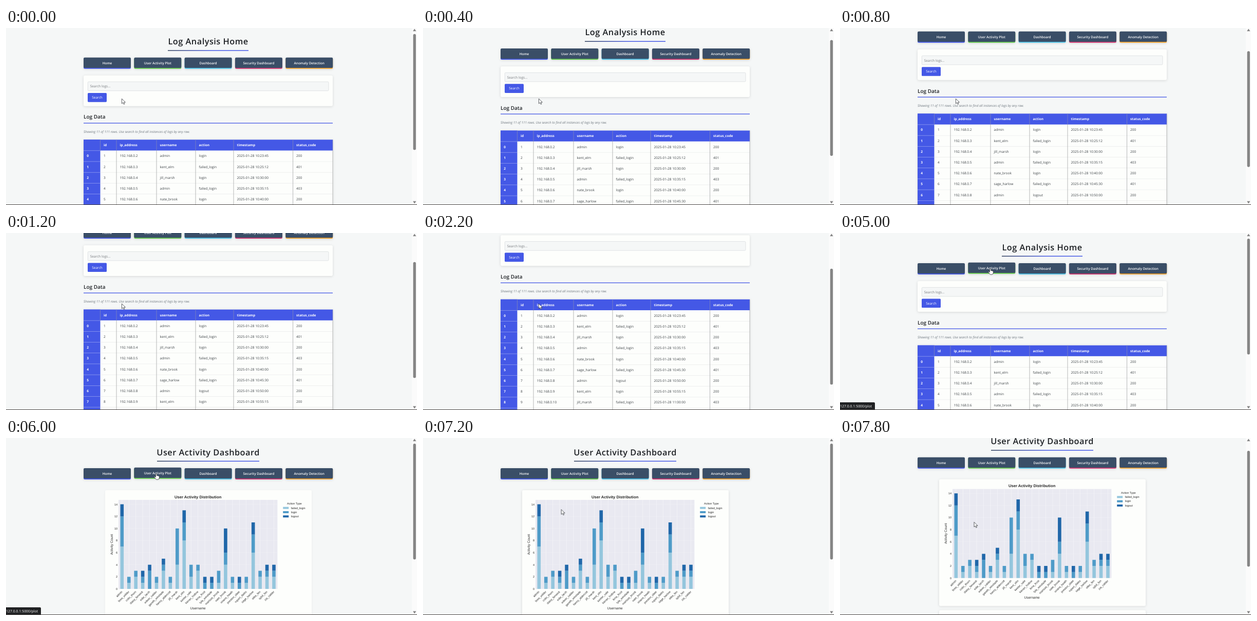
An HTML page that plays this animation: 800 by 346 pixels, repeating every 8000 ms.

```html
<!DOCTYPE html>
<html lang="en">
<head>
<meta charset="utf-8">
<title>Log Analysis</title>
<style>
  html, body { margin: 0; height: 100%; overflow: hidden; background: #f5f7f7; }
  svg { display: block; width: 100%; height: 100%; }
  text { font: 6.5px "Open Sans", "Noto Sans", sans-serif; fill: #3b4045; text-rendering: geometricPrecision; white-space: pre; }
  .title { font-size: 16.3px; font-weight: 600; letter-spacing: .5px; fill: #1d2024; }
  .heading { font-size: 10px; font-weight: 600; fill: #1d2024; }
  .bold { font-weight: 700; fill: #fff; }
  .nav { font-size: 6.45px; font-weight: 600; fill: #fff; }
  .light { fill: #fff; }
  .hint { fill: #75797d; }
  .note { font-size: 6.3px; font-style: italic; fill: #6c757d; }
  .status { font-size: 6.95px; fill: #fff; }
  .plot text { font: 5.5px "Liberation Sans", Arial, sans-serif; fill: #262626; }
  .plot .axis { font-size: 6.6px; }
  .plot .caption { font-size: 7.65px; font-weight: 700; }
  .mid { text-anchor: middle; }
  .end { text-anchor: end; }
  .shadow { filter: drop-shadow(0 1px 2.5px rgba(0, 0, 0, .13)); }
</style>
</head>
<body>
<svg id="stage" viewBox="0 0 800 346" xmlns="http://www.w3.org/2000/svg"></svg>
<script>
const BLUE = '#4458e6', PAPER = '#fdfefc', CENTER = 393.6;
const LOOP = 8000, STEP = 200, MAX_SCROLL = 146.5;

const rect = (x, y, w, h, fill, extra = '') =>
  `<rect x="${x}" y="${y}" width="${w}" height="${h}" fill="${fill}" ${extra}/>`;
const text = (s, x, y, cls = '', extra = '') =>
  `<text x="${x}" y="${y}" class="${cls}" ${extra}>${s}</text>`;
const group = (id, body, extra = '') => `<g id="${id}" ${extra}>${body}</g>`;

// Shared page header
const NAV = [
  ['Home', BLUE], ['User Activity Plot', '#62c84b'], ['Dashboard', '#4cc3e8'],
  ['Security Dashboard', '#d2336f'], ['Anomaly Detection', '#f2a32c'],
];

function pageTitle(label, x, w) {
  return text(label, CENTER, 33.6, 'title mid') + rect(x, 44.6, w, 1.5, 'url(#rule)');
}

function navButton([label, color], i) {
  const x = 151 + i * 98.3;
  const body = rect(x, 60, 92, 21, color, 'rx="2.5"') + rect(x, 59, 92, 20.3, '#3a4e67', 'rx="2.2"') +
    text(label, x + 46, 72.2, 'nav mid');
  return `<g class="shadow ${i === 1 ? 'plotButton' : ''}">${body}</g>`;
}

const nav = () => NAV.map(navButton).join('');

// Log table page
const COLUMNS = [183.5, 215, 293, 369, 443, 558.5, 636];
const HEADERS = ['id', 'ip_address', 'username', 'action', 'timestamp', 'status_code'];
const USERS = ['admin', 'kent_elm', 'jill_marsh', 'admin', 'nate_brook', 'sage_harlow',
  'admin', 'kent_elm', 'jill_marsh', 'nate_brook', 'sage_harlow'];
const ACTIONS = ['login', 'failed_login', 'login', 'failed_login', 'login', 'failed_login',
  'logout', 'login', 'failed_login', 'logout', 'login'];
const TIMES = ['10:23:45', '10:25:12', '10:30:00', '10:35:15', '10:40:00', '10:45:30',
  '10:50:00', '10:55:15', '11:00:00', '11:05:45', '11:10:00'];
const CODES = [200, 401, 200, 403, 200, 401, 200, 200, 403, 200, 200];

function table() {
  const top = 219.6, rowH = 21.2, height = rowH * 12;
  let out = rect(151, top, 485, height, PAPER, 'class="shadow"') +
    rect(151, top, 485, rowH, BLUE) + rect(151, top, 32.5, height, BLUE);
  HEADERS.forEach((h, c) => out += text(h, COLUMNS[c] + 6.6, top + 13, 'bold'));
  USERS.forEach((user, r) => {
    const y = top + rowH * (r + 1), base = y + 12.9;
    const cells = [r + 1, `192.168.0.${r + 2}`, user, ACTIONS[r], `2025-01-28 ${TIMES[r]}`, CODES[r]];
    out += rect(151, y, 32.5, .6, '#aab3f3') + text(r, 157.3, base, 'bold');
    if (r) out += rect(183.5, y, 452.5, .6, '#e4e6e6');
    cells.forEach((cell, c) => out += text(cell, COLUMNS[c] + 6.6, base));
  });
  COLUMNS.forEach((x, c) => {
    out += rect(x - .4, top, .8, rowH, '#7f87b8');
    if (c) out += rect(x - .4, top + rowH, .8, height - rowH, '#a3a5a6');
  });
  return out;
}

function logPage() {
  return pageTitle('Log Analysis Home', 315, 157) + nav() +
    rect(151, 94, 485, 60, PAPER, 'rx="3" class="shadow"') +
    rect(159.3, 106.4, 468.6, 17.6, '#f5f7f7', 'rx="1.5" stroke="#d5d9dc" stroke-width=".7"') +
    text('Search logs...', 163.8, 117.8, 'hint') +
    rect(159, 128.4, 37, 17.6, BLUE, 'rx="1.6"') + text('Search', 177.5, 139.6, 'light mid') +
    text('Log Data', 151, 178.8, 'heading') + rect(151, 186.6, 485, 1.3, BLUE) +
    text('Showing 11 of 111 rows. Use search to find all instances of logs by any row.', 151, 206.3, 'note') +
    table();
}

// Activity chart page: counts are failed_login, login, logout
const SERIES = [['failed_login', '#94c6dd'], ['login', '#4e9bc8'], ['logout', '#2067a9']];
const COUNTS = {
  admin: '752', bree_wilder: '110', colin_thorn: '210', daisy_fenwick: '111', edie_larch: '031',
  edwin_calder: '110', gareth_winslade: '311', henry_aldercott: '110', jill_marsh: '460',
  kent_elm: '832', kester_vale: '220', kieran_hollow: '310', lena_frost: '011', lyla_winslade: '011',
  marissa_brook: '120', nate_brook: '424', oriana_heath: '110', preston_slate: '011',
  rupert_dales: '110', sage_harlow: '632', silas_fen: '210', sybil_fen: '211', zia_calder: '211',
};

function chart() {
  const zero = 295, unit = 11.82;
  let out = text('User Activity Distribution', 373.6, 117.7, 'caption mid') +
    rect(219, 121, 309.3, 174, '#e9e9f1');
  for (let v = 0; v <= 14; v += 2) {
    const y = zero - v * unit;
    if (v) out += rect(219, y - .2, 309.3, .4, '#f1f1f6');
    out += text(v, 217, y + 2, 'end');
  }
  Object.entries(COUNTS).forEach(([user, counts], i) => {
    const x = 225.8 + i * 13.44;
    let y = zero;
    out += rect(x - .3, 121, .6, 174, '#f7f7fa');
    [...counts].forEach((n, s) => {
      y -= n * unit;
      if (+n) out += rect(x - 3.3, y, 6.6, n * unit, SERIES[s][1]);
    });
    out += text(user, 0, 0, 'end', `transform="translate(${x + 1.2} 301) rotate(-45)"`);
  });
  out += text('Activity Count', 0, 0, 'axis mid', 'transform="translate(207.8 208) rotate(-90)"') +
    text('Username', 373.6, 335.4, 'axis mid') + text('Action Type', 561.3, 130.2, 'mid');
  SERIES.forEach(([name, color], i) => {
    const y = 136.7 + i * 8.3;
    out += rect(539.2, y - 2, 11, 4, color) + text(name, 554.7, y + 1.8);
  });
  return `<g class="plot">${out}</g>`;
}

function chartPage() {
  const cards = rect(193, 102, 402, 247.5, PAPER, 'rx="3"') + rect(193, 358, 402, 90, PAPER, 'rx="3"');
  return pageTitle('User Activity Dashboard', 294, 199) + nav() +
    group('cardShadow', cards, 'class="shadow"') + cards + chart();
}

// Browser chrome and pointers
const arrow = '<path d="M0 0V9.6L2.3 7.6L3.9 11L5.5 10.3L4 7H7Z" fill="#fff" stroke="#33363a" stroke-width=".8" stroke-linejoin="round"/>';
const hand = '<path d="M-1 .8Q0-.5 1 .8V4.4Q2 3.6 2.7 4.7Q3.7 4 4.3 5.1Q5.6 4.6 5.8 6V8.6Q5.7 11.6 3.5 12H.4Q-1 11.6-2.2 9.4L-3.8 6.9Q-3.4 5.6-1.9 6.6L-1 7.5Z" fill="#fff" stroke="#33363a" stroke-width=".8" stroke-linejoin="round"/>';
const chrome = rect(790, 0, 10, 346, '#fbfbfb') +
  '<path d="M792 6.3L795.2 1.6L798.4 6.3ZM792 338.6L795.2 343.3L798.4 338.6Z" fill="#858585"/>' +
  rect(792.5, 11, 5.4, 226.5, '#858585', 'rx="2.7" id="thumb"') +
  group('status', '<path d="M0 331H66Q68 331 68 333V346H0Z" fill="#202123"/>' +
    text('127.0.0.1:5000/plot', 0, 340.8, 'status')) +
  rect(0, 344.9, 800, 1.1, '#55504f');

const stage = document.getElementById('stage');
stage.innerHTML = `<defs><linearGradient id="rule">
    <stop stop-color="#2f3f5c"/><stop offset=".55" stop-color="${BLUE}"/><stop offset="1" stop-color="${BLUE}"/>
  </linearGradient></defs>` + rect(0, 0, 800, 346, '#f5f7f7') +
  group('logs', logPage()) + group('activity', chartPage()) + chrome +
  group('arrow', arrow) + group('hand', hand);

const el = id => document.getElementById(id);
const [logs, activity, thumb, status, arrowEl, handEl, cardShadow] =
  ['logs', 'activity', 'thumb', 'status', 'arrow', 'hand', 'cardShadow'].map(el);
const plotButtons = document.querySelectorAll('.plotButton');

function ease(t, from, to) {
  const u = Math.min(1, Math.max(0, (t - from) / (to - from)));
  return u * u * (3 - 2 * u);
}
const show = (node, on) => node.setAttribute('visibility', on ? 'visible' : 'hidden');
const move = (node, x, y) => node.setAttribute('transform', `translate(${x} ${y})`);

function scrollAt(t) {
  if (t >= 5800) return t >= 7800 ? 21.3 : 0;
  return 1.3 + 68.7 * ease(t, 0, 1200) + (MAX_SCROLL - 70) * ease(t, 1800, 3000) -
    MAX_SCROLL * ease(t, 3800, 4400) - 1.3 * (t >= 4400);
}

function pointerAt(t) {
  if (t < 5000) return [225.4, 138.2];
  const u = ease(t, 6800, 7400);
  return [292.5 - 31.5 * u, 69.2 + 95.2 * u];
}

function render(now) {
  const t = Math.floor(now % LOOP / STEP) * STEP;
  const scroll = Math.max(0, scrollAt(t)), [x, y] = pointerAt(t);
  const hover = t >= 5000 && y < 81;

  show(logs, t < 5800);
  show(activity, t >= 5800);
  move(logs, 0, -scroll);
  move(activity, 0, -scroll);
  thumb.setAttribute('y', 11 + scroll * .655);
  cardShadow.setAttribute('opacity', .3 + .7 * ease(t, 5800, 6800));

  plotButtons.forEach(button => move(button, 0, hover ? -1.2 : 0));
  show(status, hover);
  show(handEl, hover);
  show(arrowEl, !hover);
  move(hover ? handEl : arrowEl, x, y);
  requestAnimationFrame(tick);
}

const start = performance.now();
function tick() { render(performance.now() - start); }
tick();
</script>
</body>
</html>
```
